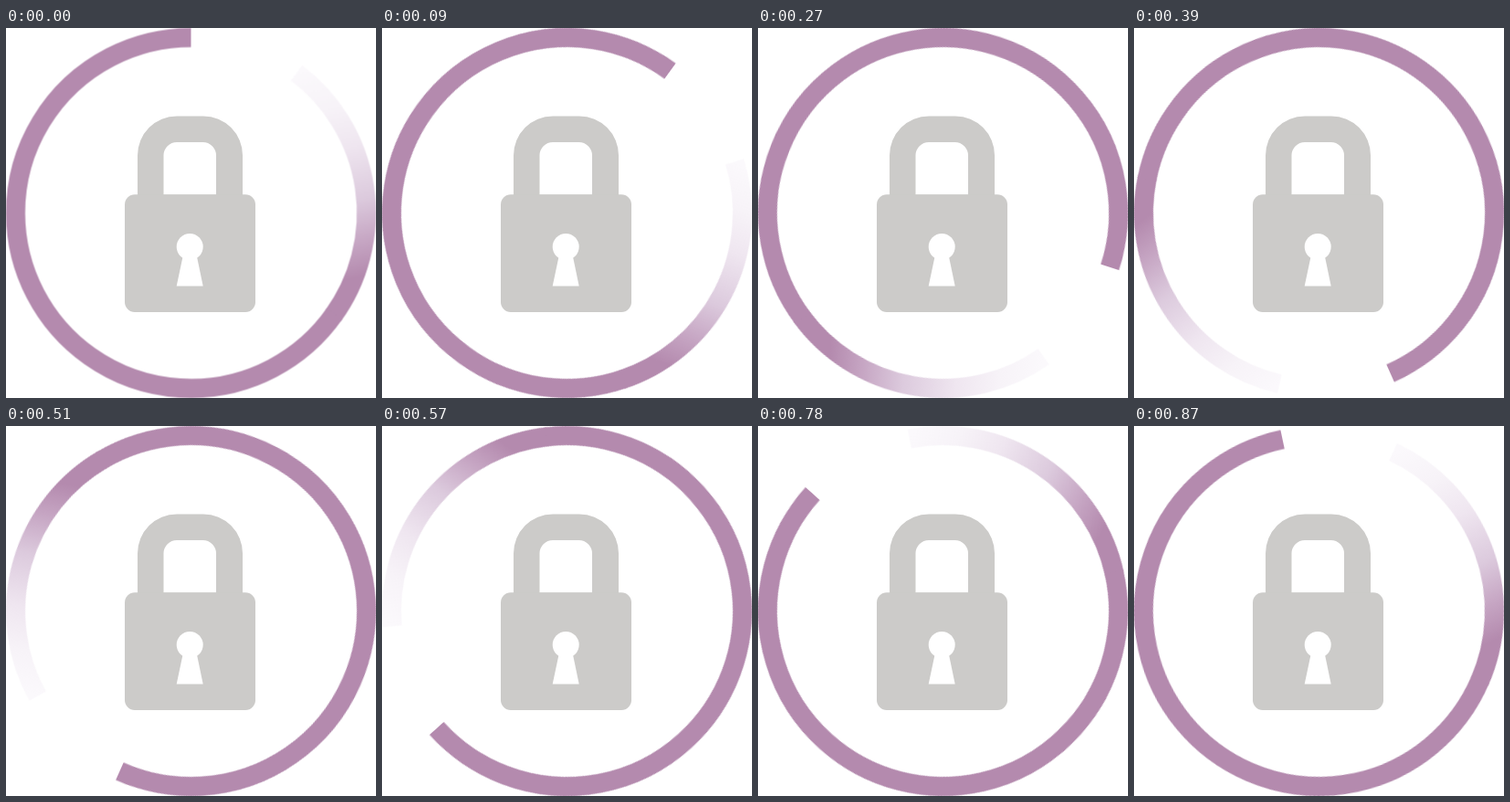
An HTML page for the animation above (0.9 s loop, 405 by 405 pixels).

```html
<!DOCTYPE html>
<html lang="en">
<head>
<meta charset="utf-8">
<title>Lock spinner</title>
<style>
  html, body { margin: 0; width: 100%; height: 100%; overflow: hidden; background: #fff; }
  svg { display: block; width: 100vw; height: 100vh; }
  .ring { fill: none; stroke-width: 21; transform-origin: 0 0; }
  .lock { fill: #cccbc9; }
  .hole { fill: #fff; }
</style>
</head>
<body>
<svg viewBox="0 0 405 405">
  <defs>
    <linearGradient id="fade" gradientUnits="userSpaceOnUse" x1="-29.3" y1="-117.4" x2="27.3" y2="109.6">
      <stop offset="0" stop-color="#fbf9fc"/>
      <stop offset=".2" stop-color="#f7f3f8"/>
      <stop offset=".4" stop-color="#efe6f0"/>
      <stop offset=".65" stop-color="#dccadd"/>
      <stop offset=".85" stop-color="#c5a4c2"/>
      <stop offset="1" stop-color="#b48aae"/>
    </linearGradient>
  </defs>
  <g transform="translate(202.5 202.5)">
    <g class="ring" id="ring">
      <path stroke="url(#fade)" d="M115.5 -153.3A192 192 0 0 1 155.3 112.9"/>
      <path stroke="#b48aae" d="M157.3 110.1A192 192 0 1 1 0 -192"/>
    </g>
  </g>
  <g class="lock">
    <path fill-rule="evenodd" d="M144 190V139.500A43 43 0 0 1 187 96.500H216A43 43 0 0 1 259 139.500V190Z
      M172.500 182.500H230V139.500A14.500 14.500 0 0 0 215.500 125H187A14.500 14.500 0 0 0 172.500 139.500Z"/>
    <rect x="130" y="182.300" width="143" height="128.700" rx="11"/>
  </g>
  <g class="hole">
    <circle cx="201.200" cy="239.500" r="14.500"/>
    <path d="M194 248H208.500L215.700 282.500H186.700Z"/>
  </g>
</svg>
<script>
  document.getElementById('ring').animate(
    [{ transform: 'rotate(0deg)' }, { transform: 'rotate(360deg)' }],
    { duration: 900, iterations: Infinity, easing: 'steps(30, end)' }
  );
</script>
</body>
</html>
```
